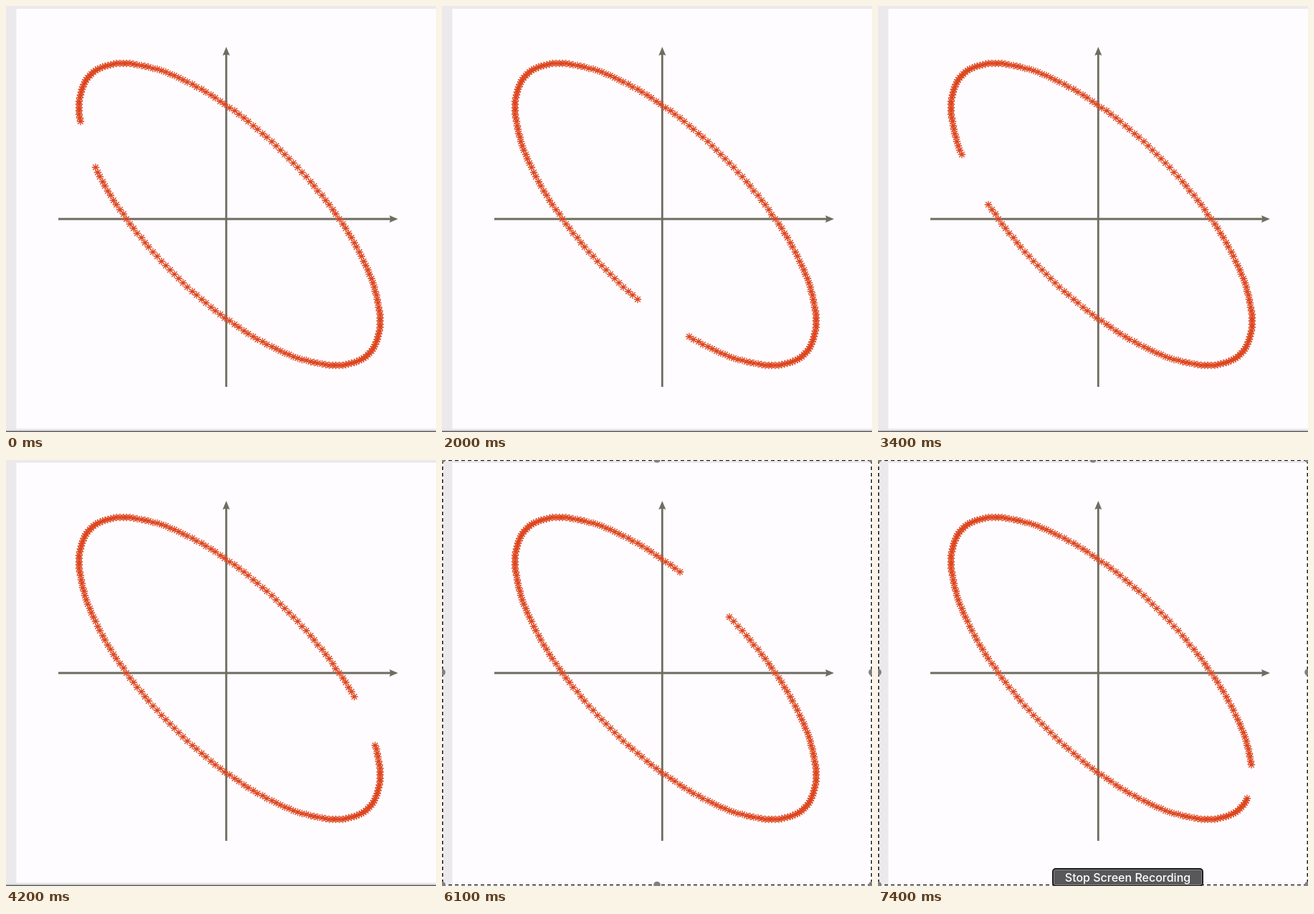
Recreate the animation shown at these times as an HTML page with a canvas. Size 600 by 594 pixels, loop 7500 ms.

```html
<!DOCTYPE html>
<html lang="en">
<head>
<meta charset="utf-8">
<title>Ellipse trace</title>
<style>
  html, body { margin: 0; width: 100%; height: 100%; overflow: hidden; background: #fefcff; }
  canvas { position: absolute; left: 0; top: 0; }
  #stop {
    position: absolute; left: 243px; top: 569px; width: 211px; height: 26px;
    box-sizing: border-box; border: 2px solid #1c1c1c; border-radius: 5px;
    box-shadow: inset 0 0 0 1px #8a8a8a;
    background: #58585a; color: #fff;
    font: 500 16px/23px Inter, "Liberation Sans", sans-serif;
    text-align: center; white-space: nowrap; visibility: hidden;
  }
</style>
</head>
<body>
<canvas id="stage" width="600" height="594"></canvas>
<div id="stop">Stop Screen Recording</div>
<script>
const W = 600, H = 594;
const STEP = 100, LOOP = 7500;
const POINTS = 200, GAP = 10, ADVANCE = 12;
const FRAME_AT = 5400, BUTTON_AT = 6400;
const AXIS = '#6f6c61', MARK = '#dd451e';

const ctx = document.getElementById('stage').getContext('2d');
const stop = document.getElementById('stop');

function rect(color, x, y, w, h) {
  ctx.fillStyle = color;
  ctx.fillRect(x, y, w, h);
}

function line(x1, y1, x2, y2) {
  ctx.beginPath();
  ctx.moveTo(x1, y1);
  ctx.lineTo(x2, y2);
  ctx.stroke();
}

function arrow(x, y, angle, length) {
  ctx.save();
  ctx.translate(x, y);
  ctx.rotate(angle);
  ctx.strokeStyle = ctx.fillStyle = AXIS;
  ctx.lineWidth = 2.8;
  line(0, 0, length - 8, 0);
  ctx.beginPath();
  ctx.moveTo(length, 0);
  ctx.lineTo(length - 12, -5);
  ctx.lineTo(length - 10.5, 0);
  ctx.lineTo(length - 12, 5);
  ctx.fill();
  ctx.restore();
}

function background() {
  rect('#fefcff', 0, 0, W, H);
  rect('#ebe9ec', 0, 0, 14.5, H);
  rect('#ebe9ec', 0, 0, W, 4);
  rect('#e6e5e7', 0, 589.5, W, 3);
  rect('#5c5c5c', 0, 592.5, W, 1.5);
}

function asterisk(x, y) {
  const r = 5.2, d = 3.8;
  ctx.moveTo(x - r, y); ctx.lineTo(x + r, y);
  ctx.moveTo(x, y - r); ctx.lineTo(x, y + r);
  ctx.moveTo(x - d, y - d); ctx.lineTo(x + d, y + d);
  ctx.moveTo(x - d, y + d); ctx.lineTo(x + d, y - d);
}

// The gap runs backwards through the evenly spaced parameter values;
// marks sit on whole pixels.
function curve(step) {
  const first = 96 - ADVANCE * step;
  ctx.strokeStyle = MARK;
  ctx.lineWidth = 1.3;
  for (let i = 0; i < POINTS - GAP; i++) {
    const a = (first + i) * 2 * Math.PI / POINTS;
    const x = 312 + 210 * Math.cos(a);
    const y = 290.5 + 210.5 * Math.cos(a - Math.PI / 4);
    ctx.beginPath();
    asterisk(Math.round(x), Math.round(y));
    ctx.stroke();
  }
}

function selection() {
  rect('#fefcff', 0, 589.5, W, 4.5);
  rect('#ebe9ec', 0, 589.5, 14.5, 4.5);
  const edges = [[0, 0.5, W, 0.5], [0, 592.5, W, 592.5], [0.8, 0, 0.8, H], [599.3, 0, 599.3, H]];
  ctx.lineWidth = 1.6;
  for (const e of edges) {
    ctx.strokeStyle = '#fff';
    line(...e);
    ctx.strokeStyle = '#222';
    ctx.setLineDash([5, 4]);
    line(...e);
    ctx.setLineDash([]);
  }
  ctx.fillStyle = '#808084';
  for (const x of [0, 300, 600]) {
    for (const y of [-1, 296, 592.5]) {
      if (x === 300 && y === 296) continue;
      ctx.beginPath();
      ctx.arc(x, y, 4.8, 0, 2 * Math.PI);
      ctx.fill();
    }
  }
}

function draw(now) {
  const step = Math.floor((now % LOOP) / STEP);
  const ms = step * STEP;
  background();
  arrow(73, 297, 0, 474);
  arrow(307.3, 531, -Math.PI / 2, 474);
  curve(step);
  if (ms >= FRAME_AT) selection();
  stop.style.visibility = ms >= BUTTON_AT ? 'visible' : 'hidden';
}

const start = performance.now();
function tick() {
  draw(performance.now() - start);
  requestAnimationFrame(tick);
}
tick();
</script>
</body>
</html>
```
